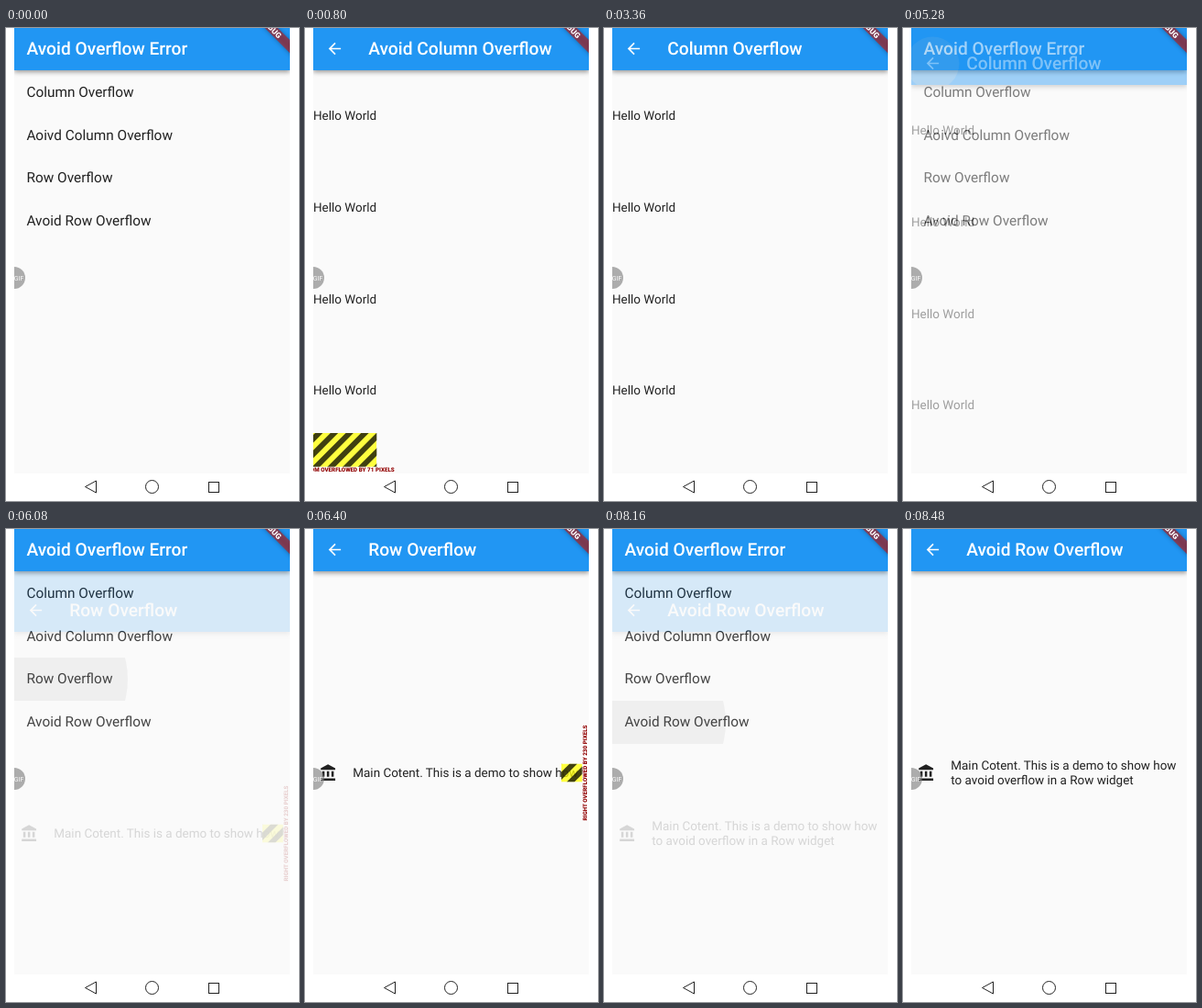
These frames come from a looping animation (320 by 515 pixels, 9.6 s). An HTML page with a canvas:

```html
<!DOCTYPE html>
<html lang="en">
<head>
<meta charset="utf-8">
<title>Overflow demo</title>
<style>
html, body { margin: 0; width: 100%; height: 100%; overflow: hidden; background: #fff; }
canvas { display: block; }
</style>
</head>
<body>
<canvas id="stage" width="320" height="515"></canvas>
<script>
const LOOP = 9600, STEP = 160, DURATION = 300;
const LEFT = 9, RIGHT = 310, WIDTH = RIGHT - LEFT, BOTTOM = 485, BAR = 46, STATUS = 20;
const DP = 0.836, SLIDE = 126, ROW_Y = 265.5;
const INK = 'rgba(0,0,0,.87)', BLUE = '#2196f3', PAPER = '#fafafa';
const BODY = '13.46px Roboto, sans-serif', ITEM = '15.4px Roboto, sans-serif';
const TITLE = '500 19.2px Roboto, sans-serif', LABEL = '800 6.27px Roboto, sans-serif';

const BACK = new Path2D('M20 11H7.83l5.59-5.59L12 4l-8 8 8 8 1.41-1.41L7.83 13H20v-2z');
const BANK = new Path2D('M4 10v7h3v-7H4zm6 0v7h3v-7h-3zM2 22h19v-3H2v3zm14-12v7h3v-7h-3zm-4.5-9L2 6v2h19V6l-9.5-5z');

const stage = document.getElementById('stage').getContext('2d');
const layer = document.createElement('canvas');
layer.width = 320;
layer.height = BOTTOM + STATUS;
const sheet = layer.getContext('2d');
for (const c of [stage, sheet]) c.textRendering = 'geometricPrecision';

const items = ['Column Overflow', 'Aoivd Column Overflow', 'Row Overflow', 'Avoid Row Overflow'];
const visits = [
  { title: 'Avoid Column Overflow', item: 1, enter: 378, leave: 1780, body: c => { helloColumn(c); columnWarning(c); } },
  { title: 'Column Overflow', item: 0, enter: 2938, leave: 5158, body: helloColumn },
  { title: 'Row Overflow', item: 2, enter: 5978, leave: 7238, body: overflowingRow },
  { title: 'Avoid Row Overflow', item: 3, enter: 8058, leave: Infinity, body: wrappedRow }
];

const clamp = (v, lo = 0, hi = 1) => Math.min(hi, Math.max(lo, v));

// Cubic Bezier easing whose end handles sit at y = 0 and y = 1.
function ease(x1, x2, x) {
  let lo = 0, hi = 1, s = 0.5;
  for (let i = 0; i < 24; i++) {
    s = (lo + hi) / 2;
    const at = 3 * x1 * (1 - s) ** 2 * s + 3 * x2 * (1 - s) * s * s + s ** 3;
    if (at < x) lo = s; else hi = s;
  }
  return 3 * (1 - s) * s * s + s ** 3;
}

function rect(c, x, y, w, h, color) {
  c.fillStyle = color;
  c.fillRect(x, y, w, h);
}

function disc(c, x, y, r, color) {
  c.fillStyle = color;
  c.beginPath();
  c.arc(x, y, r, 0, 2 * Math.PI);
  c.fill();
}

function text(c, str, x, y, font, color = INK, align = 'left') {
  c.font = font;
  c.fillStyle = color;
  c.textAlign = align;
  c.fillText(str, x, y);
}

function icon(c, path, x, y, color) {
  c.save();
  c.translate(x, y);
  c.scale(DP, DP);
  c.fillStyle = color;
  c.fill(path);
  c.restore();
}

function clipped(c, x, y, w, h, draw) {
  c.save();
  c.beginPath();
  c.rect(x, y, w, h);
  c.clip();
  draw();
  c.restore();
}

function appBar(c, title, x) {
  c.save();
  c.shadowColor = 'rgba(0,0,0,.4)';
  c.shadowBlur = 5;
  c.shadowOffsetY = 2;
  rect(c, LEFT, -STATUS, WIDTH, BAR + STATUS, BLUE);
  c.restore();
  text(c, title, x, 29, TITLE, '#fff');
}

// Diagonal hazard stripes, repeating from the given origin.
function stripes(c, x, y, w, h, originY) {
  const period = 20 * DP;
  clipped(c, x, y, w, h, () => {
    rect(c, x, y, w, h, 'rgba(255,255,0,.75)');
    c.fillStyle = 'rgba(0,0,0,.75)';
    const first = Math.floor((x - LEFT + y - originY) / period);
    for (let k = first; k * period < x + w - LEFT + y + h - originY + period; k++) {
      const start = LEFT + originY - y + (k - 0.25) * period;
      c.beginPath();
      c.moveTo(start, y);
      c.lineTo(start + period / 2, y);
      c.lineTo(start + period / 2 - h, y + h);
      c.lineTo(start - h, y + h);
      c.fill();
    }
  });
}

function warningLabel(c, str, x, y, angle) {
  c.save();
  c.translate(x, y);
  c.rotate(angle);
  c.font = LABEL;
  const w = c.measureText(str).width;
  rect(c, -w / 2, -7.3, w, 7.3, '#fff');
  text(c, str, 0, -1.6, LABEL, '#900000', 'center');
  c.restore();
}

function helloColumn(c) {
  for (let i = 0; i < 4; i++) text(c, 'Hello World', LEFT, Math.round(100.4 + 99.65 * i), BODY);
}

function columnWarning(c) {
  stripes(c, LEFT, 441, 69.3, 44, BAR);
  warningLabel(c, 'BOTTOM OVERFLOWED BY 71 PIXELS', 43.8, BOTTOM, 0);
}

function bankIcon(c) {
  icon(c, BANK, 15.5, ROW_Y - 10, INK);
}

function overflowingRow(c) {
  bankIcon(c);
  text(c, 'Main Cotent. This is a demo to show how to avoid overflow', 52.3, 270, BODY);
  stripes(c, 280, ROW_Y - 10, 30, 20, ROW_Y - 10);
  warningLabel(c, 'RIGHT OVERFLOWED BY 230 PIXELS', RIGHT, ROW_Y, -Math.PI / 2);
}

function wrappedRow(c) {
  bankIcon(c);
  text(c, 'Main Cotent. This is a demo to show how', 52.3, 262, BODY);
  text(c, 'to avoid overflow in a Row widget', 52.3, 278, BODY);
}

function home(c, pressed, progress) {
  rect(c, LEFT, 0, WIDTH, BOTTOM, PAPER);
  if (pressed >= 0) {
    clipped(c, LEFT, BAR + 47 * pressed, WIDTH, 47, () =>
      disc(c, 40, 69.5 + 47 * pressed, 93 + 150 * (progress - 0.34), 'rgba(0,0,0,.048)'));
  }
  items.forEach((name, i) => text(c, name, 22.4, Math.round(74.6 + 46.9 * i), ITEM));
  appBar(c, 'Avoid Overflow Error', 22.4);
}

function detail(visit, time, progress) {
  const c = sheet;
  c.setTransform(1, 0, 0, 1, 0, 0);
  c.clearRect(0, 0, layer.width, layer.height);
  c.translate(0, STATUS);
  rect(c, LEFT, -STATUS, WIDTH, BOTTOM + STATUS, PAPER);
  visit.body(c);
  appBar(c, visit.title, 69.2);
  const age = time - visit.leave;
  if (age > -30) {
    clipped(c, LEFT, -STATUS, WIDTH, BAR + STATUS, () =>
      disc(c, 32.4, 22.6, clamp(10 + 0.156 * age, 0, 29), 'rgba(200,200,200,.25)'));
  }
  icon(c, BACK, 22.4, 12.5, '#fff');

  stage.globalAlpha = ease(0.42, 1, progress);
  const drop = Math.round(SLIDE * (1 - ease(0.4, 0.2, progress)));
  stage.drawImage(layer, 0, drop - STATUS);
  stage.globalAlpha = 1;
}

function cornerBanner(c) {
  c.save();
  c.translate(RIGHT, -STATUS);
  c.rotate(Math.PI / 4);
  c.shadowColor = 'rgba(0,0,0,.5)';
  c.shadowBlur = 5;
  rect(c, -40, 28 * DP, 80, 12 * DP, 'rgba(183,28,28,.63)');
  c.shadowColor = 'transparent';
  text(c, 'DEBUG', 0, 34 * DP + 3, '900 8.5px Roboto, sans-serif', '#fff', 'center');
  c.restore();
}

function badge(c) {
  disc(c, LEFT, 272, 12, 'rgba(120,120,120,.6)');
  text(c, 'GIF', 14, 274.5, '7px Roboto, sans-serif', '#fff', 'center');
}

function navigation(c) {
  c.strokeStyle = '#222';
  c.lineWidth = 1;
  c.beginPath();
  c.moveTo(86.5, 499.5);
  c.lineTo(98.5, 493);
  c.lineTo(98.5, 506);
  c.closePath();
  c.stroke();
  c.beginPath();
  c.arc(159.5, 499.5, 7, 0, 2 * Math.PI);
  c.stroke();
  c.strokeRect(221.5, 494.5, 11, 11);
}

function draw(now) {
  const time = Math.floor((now % LOOP) / STEP) * STEP;
  const visit = visits.find(v => time >= v.enter && time < v.leave + DURATION);
  const leaving = visit && time >= visit.leave;
  const progress = !visit ? 0
    : leaving ? 1 - (time - visit.leave) / DURATION
    : clamp((time - visit.enter) / DURATION);

  rect(stage, 0, 0, 320, 515, '#fff');
  clipped(stage, LEFT, 0, WIDTH, BOTTOM, () => {
    home(stage, visit && !leaving ? visit.item : -1, progress);
    if (visit) detail(visit, time, progress);
    cornerBanner(stage);
    badge(stage);
  });
  navigation(stage);
}

const begin = performance.now();
function tick() {
  draw(performance.now() - begin);
  requestAnimationFrame(tick);
}
tick();
</script>
</body>
</html>
```
